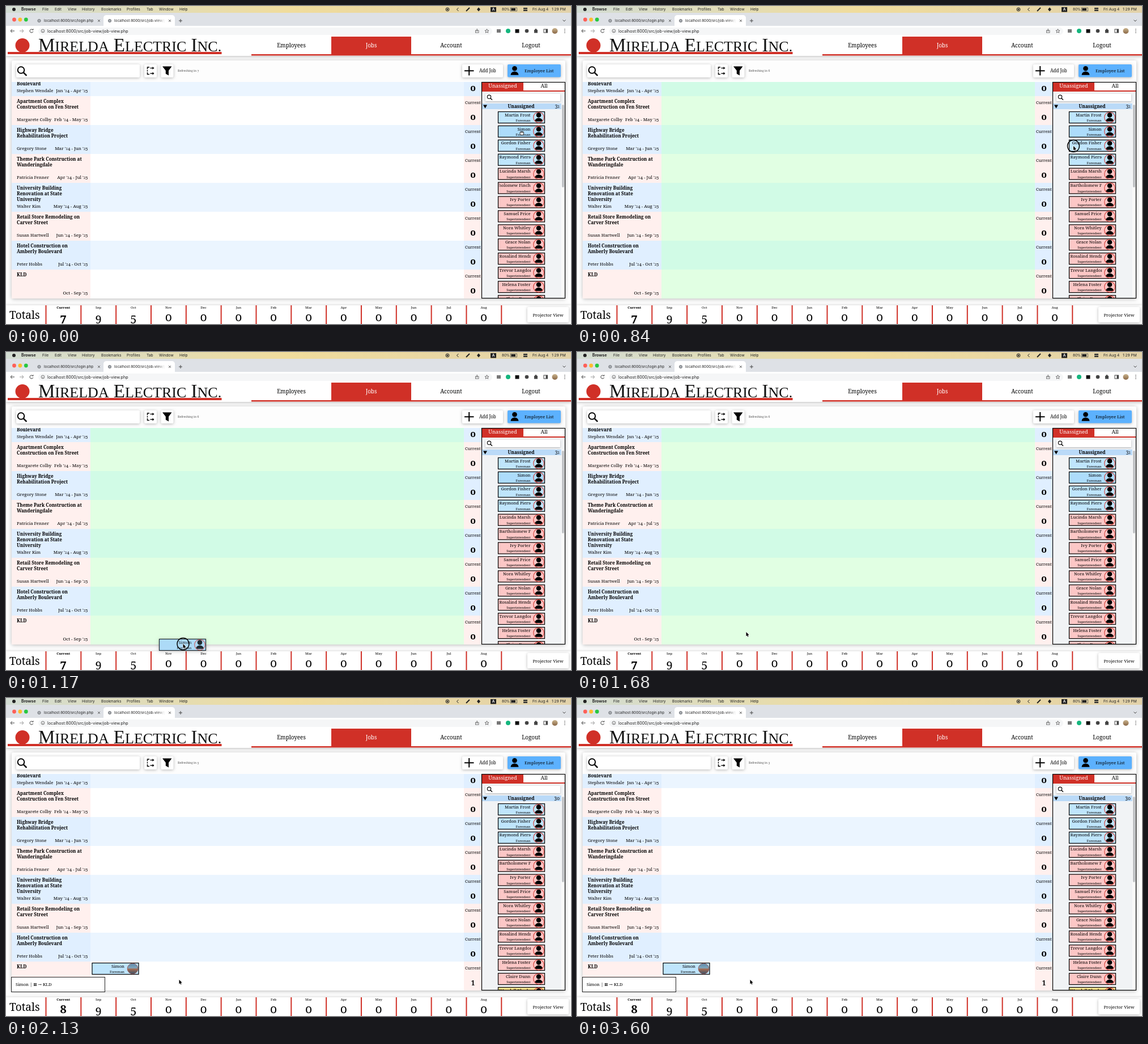
These frames come from a looping animation (997x561 px, 3.63 s). An HTML page with a canvas:

```html
<!DOCTYPE html>
<html lang="en">
<head>
<meta charset="utf-8">
<title>Job board</title>
<style>
html, body { margin: 0; width: 100%; height: 100%; overflow: hidden; background: #fff; }
canvas { display: block; width: 997px; height: 561px; }
</style>
</head>
<body>
<canvas id="stage" width="997" height="561"></canvas>
<script>
const ctx = document.getElementById('stage').getContext('2d');
const LOOP = 3630, STEP = 30;
const SERIF = '"Noto Serif", "DejaVu Serif", serif';
const SANS = 'Inter, Roboto, sans-serif';
const RED = '#d03027';

const jobs = [
  [['', '', 'Boulevard'], 'Stephen Wendale', "Jan '24 - Apr '25"],
  [['Apartment Complex', 'Construction on Fen Street'], 'Margarete Colby', "Feb '24 - May '25"],
  [['Highway Bridge', 'Rehabilitation Project'], 'Gregory Stone', "Mar '24 - Jun '25"],
  [['Theme Park Construction at', 'Wanderingdale'], 'Patricia Fenner', "Apr '24 - Jul '25"],
  [['University Building', 'Renovation at State', 'University'], 'Walter Kim', "May '24 - Aug '25"],
  [['Retail Store Remodeling on', 'Carver Street'], 'Susan Hartwell', "Jun '24 - Sep '25"],
  [['Hotel Construction on', 'Amberly Boulevard'], 'Peter Hobbs', "Jul '24 - Oct '25"],
  [['KLD'], '', "Oct - Sep '25"]
];
const foremen = ['Martin Frost', 'Simon', 'Gordon Fisher', 'Raymond Pierson'];
const supers = ['Lucinda Marsh', 'Bartholomew Finch', 'Ivy Porter', 'Samuel Price', 'Nora Whitley',
  'Grace Nolan', 'Rosalind Hendricks', 'Trevor Langdon', 'Helena Foster', 'Claire Dunn'];
const staff = [
  ...foremen.map(name => ({ name, role: 'Foreman', fill: '#bfe5fc' })),
  ...supers.map(name => ({ name, role: 'Superintendent', fill: '#fcc7c6' })),
  { name: 'Wendell Rhodes', role: 'Engineer', fill: '#fbe08c' }
];
const picked = staff[1], sliding = staff[5];
const months = 'Current Sep Oct Nov Dec Jan Feb Mar Apr May Jun Jul Aug'.split(' ');

const clamp = v => Math.max(0, Math.min(1, v));
const span = (t, a, b) => clamp((t - a) / (b - a));
const mix = (a, b, u) => a + (b - a) * u;

function rect(x, y, w, h, fill) {
  ctx.fillStyle = fill;
  ctx.fillRect(x, y, w, h);
}
function circle(x, y, r, fill, stroke, width = 1) {
  ctx.beginPath();
  ctx.arc(x, y, r, 0, Math.PI * 2);
  if (fill) { ctx.fillStyle = fill; ctx.fill(); }
  if (stroke) { ctx.strokeStyle = stroke; ctx.lineWidth = width; ctx.stroke(); }
}
function path(pts, stroke, width, fill) {
  ctx.beginPath();
  for (let i = 0; i < pts.length; i += 2) ctx.lineTo(pts[i], pts[i + 1]);
  if (fill) { ctx.closePath(); ctx.fillStyle = fill; ctx.fill(); }
  if (stroke) { ctx.strokeStyle = stroke; ctx.lineWidth = width; ctx.stroke(); }
}
function box(x, y, w, h, fill, radius = 2, blur = 5) {
  ctx.save();
  ctx.shadowColor = 'rgba(0,0,0,.28)';
  ctx.shadowBlur = blur;
  ctx.shadowOffsetY = 1;
  ctx.fillStyle = fill;
  ctx.beginPath();
  ctx.roundRect(x, y, w, h, radius);
  ctx.fill();
  ctx.restore();
}
function clipped(x, y, w, h, draw) {
  ctx.save();
  ctx.beginPath();
  ctx.rect(x, y, w, h);
  ctx.clip();
  draw();
  ctx.restore();
}
function sans(s, x, cy, size, weight = '400', color = '#222') {
  ctx.font = `${weight} ${size}px ${SANS}`;
  ctx.fillStyle = color;
  ctx.fillText(s, x, cy + size * .35);
}

// Old-style figures: 0-2 at x-height, 3 4 5 7 9 below the baseline.
function serif(s, x, cy, size, align = 0, bold = false, color = '#000') {
  const font = k => `${bold ? 'bold ' : ''}${size * k}px ${SERIF}`;
  const runs = String(s).match(/\d|\D+/g).map(c => {
    const run = { c, k: 1, dy: 0 };
    if (c === '0') Object.assign(run, { c: 'o', k: 1.05 });
    else if (c === '1' || c === '2') run.k = .78;
    else if ('34579'.includes(c)) run.dy = .19;
    ctx.font = font(run.k);
    run.w = ctx.measureText(run.c).width;
    return run;
  });
  x -= align * runs.reduce((sum, r) => sum + r.w, 0);
  ctx.fillStyle = color;
  for (const r of runs) {
    ctx.font = font(r.k);
    ctx.fillText(r.c, x, cy + size * (.34 + r.dy));
    x += r.w;
  }
}
function lens(x, y, r, width) {
  circle(x, y, r, null, '#000', width);
  path([x + r * .7, y + r * .7, x + r * 1.7, y + r * 1.7], '#000', width * 1.2);
}
function person(x, y, k) {
  circle(x, y - 3.9 * k, 4.3 * k, '#000');
  ctx.beginPath();
  ctx.ellipse(x, y + 7.5 * k, 7 * k, 6.3 * k, 0, Math.PI, 0);
  ctx.fill();
}

function browser() {
  const bar = ctx.createLinearGradient(0, 0, 997, 0);
  bar.addColorStop(0, '#d2dcd3');
  bar.addColorStop(.5, '#f0dc9c');
  bar.addColorStop(1, '#e2d2aa');
  rect(0, 0, 997, 12, bar);
  circle(14, 6, 3, '#222');
  sans('Browse', 27, 6, 7, '700');
  const menu = { File: 64, Edit: 86, View: 109, History: 134, Bookmarks: 168, Profiles: 213, Tab: 248, Window: 270, Help: 306 };
  for (const m in menu) sans(m, menu[m], 6, 6.7);

  circle(779, 6, 3, null, '#222', 1);
  circle(779, 6, 1.5, '#222');
  path([798.5, 3, 795.5, 6, 798.5, 9], '#222', 1);
  path([812, 9, 818, 3], '#222', 2);
  path([831, 6, 834, 2.5, 837, 6, 834, 9.5], null, 0, '#222');
  rect(855, 2, 10, 8.5, '#222');
  sans('A', 857.7, 6.2, 6.5, '600', '#fff');
  sans('80%', 875, 6, 6.3);
  ctx.strokeStyle = '#444';
  ctx.lineWidth = .7;
  ctx.strokeRect(890.5, 3, 11, 6);
  rect(891.5, 4, 7.5, 4, '#222');
  rect(913, 3, 7, 2.5, '#333');
  rect(913, 6.5, 7, 2.5, '#333');
  sans('Fri Aug 4', 929, 6, 6.6);
  sans('1:29 PM', 963, 6, 6.6);

  rect(0, 12, 997, 25, '#dee1e6');
  ['#fe5f57', '#febc2e', '#28c840'].forEach((c, i) => circle(14.5 + i * 10.4, 24, 3.4, c));
  ctx.fillStyle = '#fff';
  ctx.beginPath();
  ctx.roundRect(172, 16, 126, 24, 5);
  ctx.fill();
  for (const x of [58.5, 183]) circle(x, 26, 2.6, '#a9adb2', '#5f6368', .8);
  sans('localhost:8000/src/login.php', 67, 26, 6.4);
  const fade = ctx.createLinearGradient(265, 0, 281, 0);
  fade.addColorStop(0, '#222');
  fade.addColorStop(1, 'rgba(34,34,34,0)');
  clipped(190, 18, 91, 16, () => sans('localhost:8000/src/job-view/job-view.php', 191, 26, 6.4, '400', fade));
  for (const x of [164, 289]) {
    path([x - 2, 24, x + 2, 28], '#444', .8);
    path([x - 2, 28, x + 2, 24], '#444', .8);
  }
  path([305, 26, 311, 26], '#444', 1);
  path([308, 23, 308, 29], '#444', 1);
  path([982.5, 24.5, 985, 27, 987.5, 24.5], '#444', 1);

  rect(0, 35, 997, 19, '#fff');
  ctx.fillStyle = '#f5f6f7';
  ctx.beginPath();
  ctx.roundRect(57, 38, 801, 13, 6.5);
  ctx.fill();
  path([15, 44, 8, 44], '#444', 1);
  path([11, 41, 8, 44, 11, 47], '#444', 1);
  path([24, 44, 31, 44], '#999', 1);
  path([28, 41, 31, 44, 28, 47], '#999', 1);
  ctx.beginPath();
  ctx.arc(45, 44, 3, .3, 5.3);
  ctx.strokeStyle = '#444';
  ctx.stroke();
  path([45.5, 42.5, 48.4, 42.5, 48.4, 39.8], null, 0, '#444');
  circle(65, 44, 2.9, null, '#555', .8);
  path([65, 43.5, 65, 46], '#555', .8);
  sans('localhost:8000/src/job-view/job-view.php', 73, 44, 7.2);
  ctx.strokeStyle = '#555';
  ctx.strokeRect(828.5, 43, 5.5, 4);
  path([831.2, 45, 831.2, 40], '#555', .9);
  const star = [];
  for (let i = 0; i <= 10; i++) {
    const r = i % 2 ? 1.6 : 3.7, a = i * Math.PI / 5 - Math.PI / 2;
    star.push(848.5 + r * Math.cos(a), 44.3 + r * Math.sin(a));
  }
  path(star, '#555', .8);
  rect(866, 41, 7, 6, '#777');
  circle(886, 44, 4, '#15b67e');
  rect(898.5, 41, 7, 6.5, '#111');
  circle(919, 44, 3.3, '#444');
  rect(932, 42, 6, 5.5, '#444');
  circle(935, 41.7, 1.6, '#444');
  ctx.strokeStyle = '#444';
  ctx.lineWidth = 1;
  ctx.strokeRect(949, 41, 6.5, 6);
  rect(952.5, 41, 3, 6, '#444');
  const pic = ctx.createLinearGradient(0, 39, 0, 49);
  pic.addColorStop(0, '#c9b38d');
  pic.addColorStop(1, '#8a6846');
  circle(968.5, 44, 5, pic);
  for (const y of [41, 44, 47]) circle(986, y, .8, '#444');
}

function brand() {
  box(0, 54, 997, 34, '#fff', 0, 5);
  rect(3, 81, 377.5, 4, RED);
  circle(29, 69.5, 12.5, RED);
  let x = 57;
  ctx.fillStyle = '#111';
  for (const word of ['Mirelda', 'Electric', 'Inc.']) {
    [[word[0], 33], [word.slice(1).toUpperCase(), 26]].forEach(([s, size]) => {
      ctx.font = `${size}px "Liberation Serif", "Times New Roman", serif`;
      ctx.fillText(s, x, 80);
      x += ctx.measureText(s).width;
    });
    x += 8.2;
  }
  rect(433, 85, 564, 2.5, RED);
  rect(574, 54, 141, 33, RED);
  ['Employees', 'Jobs', 'Account', 'Logout'].forEach((s, i) =>
    serif(s, 503.5 + i * 141, 70, 9.9, .5, false, i === 1 ? '#fff' : '#000'));
}

function tools(seconds) {
  box(18, 103, 218, 23, '#fff');
  lens(26.5, 113, 5.8, 2);
  box(244, 103, 22, 23, '#fff');
  path([253, 108, 249.5, 108, 249.5, 111.5], '#000', 1.4);
  path([249.5, 113, 249.5, 115.5], '#000', 1.4);
  path([249.5, 117, 249.5, 120.5, 253, 120.5], '#000', 1.4);
  for (const y of [109.5, 119]) {
    path([254.5, y, 259, y], '#000', 1.4);
    path([258.5, y - 2.4, 261.5, y, 258.5, y + 2.4], null, 0, '#000');
  }
  box(273.5, 103, 22, 23, '#fff');
  path([276, 106.5, 292.5, 106.5, 287, 114, 287, 122.5, 281.8, 119.5, 281.8, 114], null, 0, '#000');
  serif('Refreshing in ' + seconds, 303, 114, 5.2, 0, false, '#555');
  box(805, 103, 72, 23, '#fff');
  path([809, 114.3, 825.5, 114.3], '#000', 2);
  path([817.2, 106, 817.2, 122.5], '#000', 2);
  serif('Add Job', 835, 114, 8);
  box(885, 103, 94, 22.5, '#5cb1fe');
  person(897.5, 114.2, 1);
  serif('Employee List', 915, 114, 7.7);
}

function employee(x, y, who, opt = {}) {
  rect(x, y, 83, 21, opt.fill || who.fill);
  ctx.strokeStyle = '#000';
  ctx.lineWidth = 1.2;
  ctx.strokeRect(x + .5, y + .5, 82, 20);
  const left = x + 2.5, right = x + 57.5, size = 7.6;
  clipped(left, y + 1, 55.5, 19, () => {
    ctx.font = `${size}px ${SERIF}`;
    const over = Math.max(0, ctx.measureText(who.name).width - (right - left));
    if (over) serif(who.name, left - over * (opt.scroll || 0), y + 6, size);
    else serif(who.name, right, y + 6, size, 1);
    serif(who.role, right, y + 16, who.role === 'Foreman' ? 6.1 : 5.7, 1);
  });
  const cx = x + 72, cy = y + 10.5;
  if (opt.photo) {
    const g = ctx.createLinearGradient(0, cy - 9, 0, cy + 9);
    [['0', '#5d87a8'], ['.42', '#7fa6bd'], ['.55', '#a36b52'], ['1', '#3b5268']]
      .forEach(([at, c]) => g.addColorStop(+at, c));
    circle(cx, cy, 9.3, g, '#9b4a42', .8);
    return;
  }
  ctx.save();
  ctx.beginPath();
  ctx.arc(cx, cy, 9.2, 0, 7);
  ctx.clip();
  person(cx, cy - .2, 1);
  ctx.restore();
  circle(cx, cy, 9.3, null, '#d6403a', 1.1);
}

function table(green, done) {
  clipped(10, 134, 829, 382, () => jobs.forEach(([title, lead, dates], i) => {
    const y = 108 + i * 51, odd = i % 2;
    const side = odd ? '#fff0ee' : '#e0efff';
    rect(10, y, 139, 51, side);
    rect(149, y, 659, 51, green ? (odd ? '#e1ffe3' : '#d1fbe6') : (odd ? '#fff' : '#ebf5ff'));
    rect(808, y, 31, 51, side);
    title.forEach((s, n) => s && serif(s, 19, y + 9.7 + n * 9.8, 8.07, 0, true));
    if (lead) serif(lead, 19, y + 41, 7.75);
    serif(dates, 144.5, y + 41, 7.9, 1);
    serif('Current', 810, y + 11.5, 7.4);
    serif(done && i === 7 ? '1' : '0', 824, y + 36.4, 15, .5, true);
  }));
  if (done) employee(151.5, 467, picked, { photo: true });
}

function panel(t, done) {
  rect(839, 134, 148, 382, '#f1f3f5');
  rect(840, 135, 73, 15, RED);
  rect(913, 135, 73, 14, '#fff');
  rect(840, 149, 146, 2, RED);
  serif('Unassigned', 876.5, 140.5, 9.2, .5, false, '#fff');
  serif('All', 949.5, 140.5, 9.2, .5);
  box(846, 155, 132, 13, '#fff', 1, 3);
  lens(852.5, 160.3, 3.2, 1.1);
  rect(840, 172, 140, 10, '#badaf8');
  path([842, 174.5, 849, 174.5, 845.5, 180.5], null, 0, '#000');
  serif('Unassigned', 909, 177, 8.1, .5, true);
  serif(done ? 30 : 31, 977, 177, 8.4, 1);
  rect(980, 172, 6, 343, '#fafafa');
  ctx.fillStyle = '#bfc1c4';
  ctx.beginPath();
  ctx.roundRect(981, 174, 4, done ? 151 : 146, 2);
  ctx.fill();
  clipped(840, 182, 140, 333, () => {
    staff.filter(p => !done || p !== picked).slice(0, 14).forEach((p, i) =>
      employee(868, 186 + i * 24.92, p, {
        fill: p === picked ? '#addcfb' : p.fill,
        scroll: p === sliding ? 1 - span(t, 0, 330) : 0
      }));
  });
  ctx.strokeStyle = '#000';
  ctx.lineWidth = 1.2;
  ctx.strokeRect(839.5, 134.5, 147, 381);
}

function totals(done) {
  const pitch = 61.83;
  box(0, 528, 997, 40, '#fff', 0, 6);
  serif('Totals', 6, 546, 19);
  for (let i = 0; i <= months.length; i++) rect(69.5 + i * pitch, 528, 2, 33, RED);
  months.forEach((m, i) => {
    const x = 101.2 + i * pitch;
    serif(m, x, 532, 6, .5, !i);
    const n = i === 0 ? (done ? 8 : 7) : i === 1 ? 9 : i === 2 ? 5 : 0;
    serif(n, x, 549.3, 20, .5, !i);
  });
  box(920, 531, 73, 27, '#fff');
  serif('Projector View', 956.5, 545, 7.7, .5);
}

function pointerAt(t) {
  if (t < 840) return [910, 223];
  if (t < 1170) {
    const u = span(t, 840, 1170), e = .6 * u * u * (3 - 2 * u) + .4 * u;
    return [mix(876, 312.5, e), mix(247, 515, e)];
  }
  const u = span(t, 1170, 1410), e = 1 - (1 - u) ** 2;
  const v = span(t, 1740, 2010);
  return [mix(312.5, 298.5, e) + 7 * v, mix(515, 494, e) + 3 * v];
}
function arrow(x, y) {
  const p = [0, 0, 0, 7.4, 1.7, 5.9, 2.8, 8.4, 4, 7.9, 2.9, 5.5, 5.2, 5.3];
  path(p.map((v, i) => v + (i % 2 ? y : x)).concat(x, y), '#fff', 1.4);
  path(p.map((v, i) => v + (i % 2 ? y : x)), null, 0, '#000');
}
function hand(x, y) {
  ctx.fillStyle = '#fff';
  ctx.strokeStyle = '#000';
  ctx.lineWidth = .8;
  ctx.beginPath();
  ctx.roundRect(x - 3, y - 1.5, 6.5, 6, 2);
  ctx.fill();
  ctx.stroke();
  for (const d of [-1.2, .4, 2]) path([x + d, y - 1.5, x + d, y + 1.3], '#000', .7);
}
function pointer(t) {
  const [x, y] = pointerAt(t);
  if (t >= 870 && t < 1410) {
    ctx.save();
    ctx.globalAlpha = .8;
    box(x - 42.5, y - 9, 83, 21, '#addcfb', 0, 6);
    employee(x - 42.5, y - 9, picked, { fill: '#addcfb' });
    ctx.restore();
  }
  if (t < 840) hand(x, y);
  else arrow(x, y);
  if (t >= 750 && t < 1500) {
    const out = span(t, 1410, 1500);
    ctx.globalAlpha = span(t, 720, 810) * (1 - out);
    circle(x, y, 10.5 + 13.5 * (1 - span(t, 750, 840)) + 10 * out, null, '#000', 1.4);
    ctx.globalAlpha = 1;
  }
}
function toast(t) {
  const shown = span(t, 1920, 2100);
  if (!shown) return;
  ctx.globalAlpha = shown;
  rect(9, 492, 166, 27, '#fff');
  ctx.strokeStyle = '#222';
  ctx.lineWidth = 1;
  ctx.strokeRect(9.5, 492.5, 165, 26);
  serif('Simon | ⊠ → KLD', 17, 505.5, 7.6);
  ctx.globalAlpha = 1;
}

function draw(t) {
  const done = t >= 1890;
  const seconds = 7 - [660, 1710, 2610, 3510].filter(s => t >= s).length;
  rect(0, 0, 997, 561, '#fff');
  brand();
  browser();
  box(10, 96, 977, 420, '#fdfdfd', 2, 7);
  tools(seconds);
  table(t >= 840 && t < 1770, done);
  panel(t, done);
  totals(done);
  toast(t);
  pointer(t);
}

let start, last = -1;
function tick(now) {
  start ??= now;
  const t = Math.floor(((now - start) % LOOP) / STEP) * STEP;
  if (t !== last) draw(last = t);
  requestAnimationFrame(tick);
}
draw(0);
requestAnimationFrame(tick);
</script>
</body>
</html>
```
